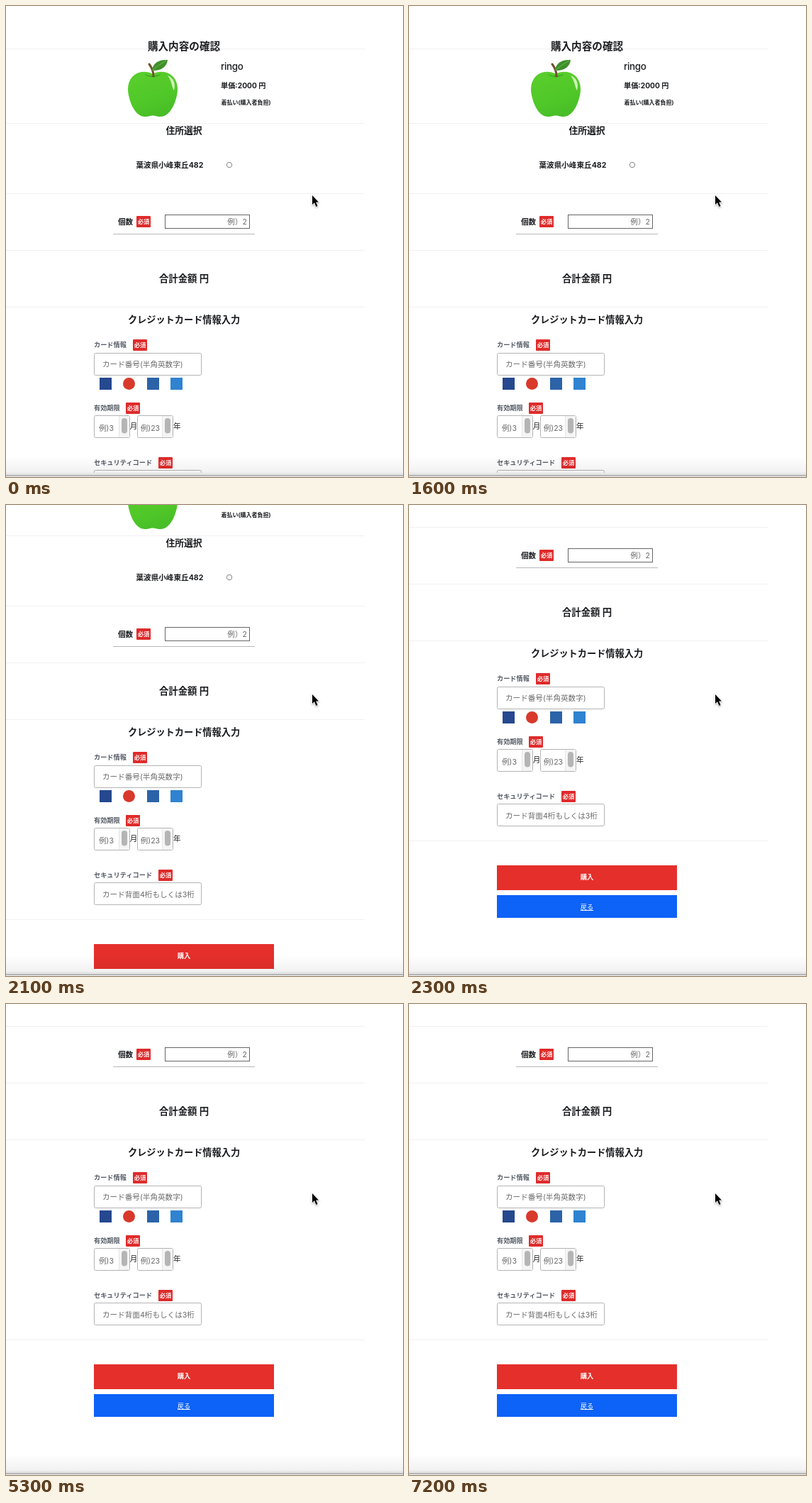
These frames come from a looping animation (560 px wide and 664 px high, 7.3 s). An HTML page:

```html
<!DOCTYPE html>
<html lang="ja">
<head>
<meta charset="utf-8">
<style>
html, body { margin: 0; width: 100%; height: 100%; overflow: hidden; background: #fff; }
svg { display: block; width: 560px; height: 664px; font-family: Inter, "Noto Sans CJK JP", "Noto Sans CJK", sans-serif; }
text { fill: #1b1d20; font-size: 10.6px; }
.bold { font-weight: 700; }
.head { font-weight: 700; font-size: 13.2px; text-anchor: middle; }
.label { font-weight: 700; font-size: 9.2px; fill: #555c66; }
.hint { fill: #6a6a6a; }
.end { text-anchor: end; }
.white { fill: #fff; text-anchor: middle; }
.box { fill: #fff; stroke: #b4b4b4; }
</style>
</head>
<body>
<svg viewBox="0 0 560 664">
  <defs>
    <linearGradient id="skin" x1=".2" x2=".6" y2="1">
      <stop stop-color="#5ace2c"/><stop offset=".6" stop-color="#50c829"/><stop offset="1" stop-color="#48bd27"/>
    </linearGradient>
    <linearGradient id="fade" x2="0" y2="1">
      <stop stop-opacity="0"/><stop offset="1" stop-opacity=".055"/>
    </linearGradient>
    <clipPath id="view"><path d="M0 0H560V658H0Z"/></clipPath>
    <g id="badge">
      <rect y="-1" width="20" height="16" rx="1" fill="#df2b2b"/>
      <text class="white bold" x="10" y="10.2" style="font-size:8.3px">必須</text>
    </g>
    <g id="spinner">
      <rect class="box" x=".5" y=".5" width="50" height="31" rx="2"/>
      <path d="M36 1H50V31H36Z" fill="#f5f5f5"/>
      <path d="M35.5 1V31" stroke="#e6e6e6"/>
      <rect x="39" y="4" width="8" height="21.5" rx="4" fill="#b5b5b5"/>
    </g>
  </defs>

  <g clip-path="url(#view)">
  <g id="page">
    <path d="M0 60.5H506M0 165.5H506M0 264.5H506M0 344.5H506M0 424.5H506M0 706.5H506" stroke="#f1f1f1"/>
    <text class="head" x="251" y="61.6" style="font-size:14.6px">購入内容の確認</text>

    <path d="M207 96C215 91 227 92 234 98C242 105 244 117 240 130C236 145 228 156 218 156C212 156 211 154.5 207 154.5C203 154.5 202 156 196 156C186 156 178 145 174 130C170 117 172 105 180 98C187 92 199 91 207 96Z" fill="url(#skin)"/>
    <path d="M195 96Q207 104 219 96Q209 99 207 98.5Q203 99 195 96Z" fill="#359c1d"/>
    <path d="M228 98C236 101 240 109 237 119C234 115 234 106 228 98Z" fill="#d9f6c4" opacity=".9"/>
    <path d="M208 99Q208 90 202 82" fill="none" stroke="#70502c" stroke-width="3" stroke-linecap="round"/>
    <path d="M206 91C207 80 216 75 228 76C227 86 218 92 206 91Z" fill="#3f8f2b"/>
    <path d="M206 91Q215 83 226 77" fill="none" stroke="#72b652"/>

    <text x="303" y="90" style="font-size:13.4px;font-weight:500;letter-spacing:-.3px">ringo</text>
    <text class="bold" x="303" y="115.8" style="font-size:10.2px">単価:2000 円</text>
    <text class="bold" x="303.5" y="139" style="font-size:8px">着払い(購入者負担)</text>

    <text class="head" x="251" y="179.9" style="font-size:12.8px">住所選択</text>
    <text class="bold" x="183.5" y="228">葉波県小峰東丘482</text>
    <circle cx="315" cy="224" r="3.7" fill="#fff" stroke="#858585"/>

    <text class="bold" x="158" y="308">個数</text>
    <use href="#badge" x="184" y="297"/>
    <rect x="224.5" y="294.5" width="119" height="19" fill="#fff" stroke="#666"/>
    <text class="hint end" x="340" y="308">例）2</text>
    <path d="M151 321.5H351" stroke="#b8b8b8"/>

    <text class="head" x="251" y="388.6" style="font-size:13.4px">合計金額 円</text>
    <text class="head" x="251" y="446.6">クレジットカード情報入力</text>

    <text class="label" x="124" y="481.2">カード情報</text>
    <use href="#badge" x="179" y="471"/>
    <rect class="box" x="124.5" y="489.5" width="151" height="31" rx="2"/>
    <text class="hint" x="136" y="509.3">カード番号(半角英数字)</text>
    <rect x="132" y="524" width="17" height="17" fill="#25488f"/>
    <circle cx="173.5" cy="532.5" r="8.5" fill="#d8392b"/>
    <rect x="199" y="524" width="17" height="17" fill="#2c63a8"/>
    <rect x="232" y="524" width="17" height="17" fill="#2f83d0"/>

    <text class="label" x="124" y="570.2">有効期限</text>
    <use href="#badge" x="169" y="560"/>
    <use href="#spinner" x="124" y="577"/>
    <text class="hint" x="131" y="599">例)3</text>
    <text x="174.7" y="596">月</text>
    <use href="#spinner" x="185" y="577"/>
    <text class="hint" x="189.7" y="599">例)23</text>
    <text x="236" y="596">年</text>

    <text class="label" x="124" y="647.2">セキュリティコード</text>
    <use href="#badge" x="215" y="637"/>
    <rect class="box" x="124.5" y="654.5" width="151" height="31" rx="2"/>
    <text class="hint" x="136" y="675.3">カード背面4桁もしくは3桁</text>

    <path d="M124 741H378V776H124Z" fill="#e52f2b"/>
    <text class="white bold" x="251" y="761.3" style="font-size:9.3px">購入</text>
    <path d="M124 783H378V815H124Z" fill="#0d62f7"/>
    <text class="white" x="251" y="802.5" style="font-size:9.2px;font-weight:500">戻る</text>
    <path d="M242 804.5H260" stroke="#fff"/>
  </g>
  </g>

  <path d="M0 634H560V658H0Z" fill="url(#fade)"/>
  <path d="M0 658H560V661H0Z" fill="#e6e6e6"/>
  <path d="M0 661H560V663H0Z" fill="#b4b4b4"/>
  <path d="M0 663H560V664H0Z" fill="#f0f0f0"/>
  <path d="M432 267V280L435 277.3L437.4 283L439.6 282L437.2 276.5H441Z" stroke="#fff" stroke-width="1.6" paint-order="stroke" style="filter:drop-shadow(0 1px 1px #0005)"/>
</svg>
<script>
const LOOP = 7300, STEP = 100, SCROLL = 233, START = 1887, END = 2300;
const page = document.getElementById('page');

function draw(now) {
  const time = Math.floor(now % LOOP / STEP) * STEP;
  const u = Math.min(1, Math.max(0, (time - START) / (END - START)));
  const offset = Math.round(SCROLL * u * u * (3 - 2 * u));
  page.setAttribute('transform', `translate(0 ${-offset})`);
  requestAnimationFrame(draw);
}
draw(performance.now());
</script>
</body>
</html>
```
